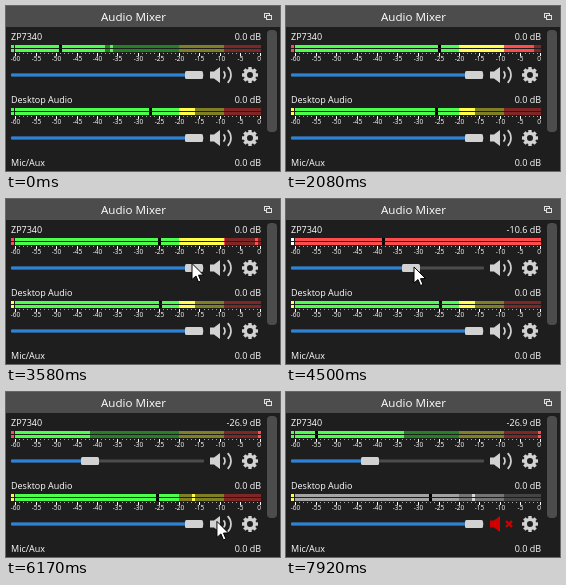
An HTML page with a canvas that plays this animation: 274x165 px, repeating every 8000 ms.

```html
<!DOCTYPE html>
<html lang="en">
<head>
<meta charset="utf-8">
<title>Audio Mixer</title>
<style>
  html, body { margin: 0; width: 100%; height: 100%; overflow: hidden; background: #1f1e1f; }
  canvas { display: block; width: 274px; height: 165px; }
</style>
</head>
<body>
<canvas id="stage"></canvas>
<script>
const W = 274, H = 165, LOOP = 8000, STEP = LOOP / 96;
const canvas = document.getElementById('stage');
const ctx = canvas.getContext('2d');
const ratio = window.devicePixelRatio || 1;
canvas.width = W * ratio;
canvas.height = H * ratio;
ctx.scale(ratio, ratio);

const FONT = '"Open Sans", "Noto Sans", sans-serif';
const ICON = '#d2d2d2', MUTE_RED = '#d00000';
const LEFT = 9, PER_DB = 4.1, DECAY = 23.5;
const LOUD_AT = 1185, CLIP_AT = 3950, CLIP_END = 4800, MUTE_AT = 6400;
const CURSOR = [2050, 7080], DRAG = [4250, 5250];
const KNOB_MAX = 188, GRAB = 3;

const LIVE = {
  back: ['#267f26', '#7f7f26', '#7f2626'],
  front: ['#4cff4c', '#ffff4c', '#ff4c4c']
};
const MUTED = {
  back: ['#5a5a5a', '#757575', '#444444'],
  front: ['#a3a3a3', '#d9d9d9', '#ffffff']
};

// Each phase repeats a peak that then falls; rise is dB per second
const speech = [
  { from: 0, top: -38, rise: 0, period: 527 },
  { from: LOUD_AT, top: -2.5, rise: 0.9, period: 395 },
  { from: CLIP_AT, top: 0.5, rise: 0, period: 1842 },
  { from: 5792, top: -33, rise: 0, period: 527 }
];
const music = [{ from: 0, top: -16.1, rise: 0, period: 250 }];

const voiceMark = [[0, 54], [900, 50], [1650, 153], [3900, 153], [4500, 97], [5300, 8], [7300, 8], [7920, 30]];
const pointer = [
  [2050, 206, 139], [2500, 181, 63], [2750, 181, 63], [4250, 191, 66],
  [4500, 128, 68], [5250, 87, 66], [5550, 87, 66], [6250, 216, 132]
];

const linear = k => k;
const smooth = k => k * k * (3 - 2 * k);
const clamp = (v, a, b) => Math.max(a, Math.min(b, v));
const within = (t, a, b) => t >= a && t < b;
const toX = db => Math.round(LEFT + (db + 60) * PER_DB);
const zone = db => db < -20 ? 0 : db < -9 ? 1 : 2;

function along(keys, t, col, ease) {
  const i = keys.findIndex(k => k[0] > t);
  if (i < 0) return keys[keys.length - 1][col];
  if (i === 0) return keys[0][col];
  const a = keys[i - 1], b = keys[i];
  return a[col] + (b[col] - a[col]) * ease((t - a[0]) / (b[0] - a[0]));
}

function signal(phases, t) {
  const p = phases.filter(ph => ph.from <= t).pop();
  const since = (t - p.from) % p.period;
  const peak = p.top + p.rise * (t - p.from - since) / 1000;
  return { peak, level: clamp(peak - DECAY * since / 1000, -60, 0) };
}

function rect(x, y, w, h, color) {
  ctx.fillStyle = color;
  ctx.fillRect(x, y, w, h);
}

function box(x, y, w, h, r, color) {
  ctx.fillStyle = color;
  ctx.beginPath();
  ctx.roundRect(x, y, w, h, r);
  ctx.fill();
}

function label(text, x, y, size, align = 'left') {
  ctx.font = `${size}px ${FONT}`;
  ctx.textAlign = align;
  ctx.fillStyle = '#fff';
  ctx.fillText(text, x, y);
}

function bar(y, m, pal) {
  const edges = [-60, -20, -9, 0].map(toX);
  const end = m.clip ? edges[3] : toX(m.level);
  for (let i = 0; i < 3; i++) {
    const a = edges[i], b = edges[i + 1];
    rect(a, y, b - a, 3, pal.back[i]);
    if (end > a) rect(a, y, Math.min(b, end) - a, 3, pal.front[m.clip ? 2 : i]);
  }
  rect(toX(m.hold) - 3, y, 3, 3, pal.front[m.clip ? 2 : zone(m.hold)]);
  if (m.mark > LEFT + 2) rect(Math.round(m.mark) - 1, y, 3, 3, '#000');
  rect(5, y, 3, 3, m.input);
}

function meter(y, m, pal) {
  bar(y, m, pal);
  bar(y + 4, m, pal);
  for (let db = -60; db <= 0; db++) {
    const x = Math.min(254, toX(db));
    const major = db % 5 === 0;
    rect(x, y + 8, 1, major ? 3 : 1, major ? '#fff' : '#aaa');
    if (major) label(db, db ? x + 0.5 : 253, y + 16, 6.5, 'center');
  }
}

function slider(y, knob) {
  box(5, y - 1.5, 193, 3, 1, '#4c4c4c');
  box(5, y - 1.5, knob - 5, 3, 1, '#2a82da');
  box(knob - 9, y - 4, 18, 8, 1.5, ICON);
}

function speaker(y, muted) {
  ctx.fillStyle = ctx.strokeStyle = muted ? MUTE_RED : ICON;
  ctx.beginPath();
  [[204, -3.5], [208, -3.5], [214, -8], [214, 8], [208, 3.5], [204, 3.5]]
    .forEach(([x, dy]) => ctx.lineTo(x, y + dy));
  ctx.fill();
  ctx.beginPath();
  if (muted) {
    ctx.lineWidth = 2.2;
    ctx.moveTo(220, y - 3); ctx.lineTo(226, y + 3);
    ctx.moveTo(226, y - 3); ctx.lineTo(220, y + 3);
  } else {
    ctx.lineWidth = 1.7;
    for (const r of [5, 11]) {
      ctx.moveTo(214 + r * Math.cos(0.8), y - r * Math.sin(0.8));
      ctx.arc(214, y, r, -0.8, 0.8);
    }
  }
  ctx.stroke();
}

function gear(x, y) {
  ctx.save();
  ctx.translate(x, y);
  ctx.strokeStyle = ICON;
  ctx.lineWidth = 3.2;
  ctx.beginPath();
  ctx.arc(0, 0, 4.6, 0, Math.PI * 2);
  ctx.stroke();
  for (let i = 0; i < 8; i++) {
    rect(-1.7, -8, 3.4, 3, ICON);
    ctx.rotate(Math.PI / 4);
  }
  ctx.restore();
}

function heading(y, name, volume) {
  label(name, 5, y + 34, 9);
  label(`${volume} dB`, 255, y + 34, 9, 'right');
}

function channel(y, name, volume, knob, m, muted) {
  heading(y, name, volume);
  meter(y + 39, m, muted ? MUTED : LIVE);
  slider(y + 69, knob);
  speaker(y + 69, muted);
  gear(244, y + 69);
}

function arrow(x, y) {
  ctx.beginPath();
  [[0, 0], [0, 16], [4, 12.5], [6.5, 18.5], [9, 17.5], [6.5, 11.7], [11.5, 11.5]]
    .forEach(([dx, dy]) => ctx.lineTo(x + dx, y + dy));
  ctx.closePath();
  ctx.fillStyle = '#fff';
  ctx.fill();
  ctx.strokeStyle = '#000';
  ctx.lineWidth = 1;
  ctx.stroke();
}

function panel() {
  rect(0, 0, W, H, '#1f1e1f');
  rect(0, 0, W, 21, '#4c4c4c');
  label('Audio Mixer', 127.5, 15, 11.6, 'center');
  ctx.strokeStyle = '#e0e0e0';
  ctx.lineWidth = 1;
  ctx.strokeRect(258.5, 7.5, 5, 4);
  rect(260, 9, 6, 5, '#4c4c4c');
  ctx.strokeRect(260.5, 9.5, 5, 4);
  box(261, 24, 10, 102, 4, '#4c4c4c');
}

function inputColor(t) {
  const [green, , red] = LIVE.front;
  if (within(t, CLIP_AT, DRAG[1])) return '#fff';
  return within(t, LOUD_AT, CLIP_AT) || within(t, 5700, 7600) ? red : green;
}

function voice(t) {
  const { peak, level } = signal(speech, t);
  return {
    level,
    hold: t < LOUD_AT ? -36 : t < CLIP_AT ? peak : 0,
    mark: along(voiceMark, t, 1, linear),
    clip: within(t, CLIP_AT, CLIP_END),
    input: inputColor(t)
  };
}

function desktop(t) {
  const { peak, level } = signal(music, t);
  const turn = t / LOOP * Math.PI * 2;
  return {
    level,
    hold: peak,
    mark: 150 - 3 * Math.cos(turn) - 3 * Math.cos(3 * turn),
    clip: false,
    input: LIVE.front[t < LOUD_AT ? 0 : 1]
  };
}

function draw(t) {
  panel();
  const knob = along(pointer, clamp(t, ...DRAG), 1, smooth) - GRAB;
  const cut = KNOB_MAX - knob;
  const volume = cut ? (-0.02934 * cut - 0.002205 * cut * cut).toFixed(1) : '0.0';

  channel(0, 'ZP7340', volume, knob, voice(t), false);
  channel(63, 'Desktop Audio', '0.0', KNOB_MAX, desktop(t), t >= MUTE_AT);
  heading(126, 'Mic/Aux', '0.0');

  if (within(t, ...CURSOR)) arrow(along(pointer, t, 1, smooth), along(pointer, t, 2, smooth));
}

const start = performance.now();
function tick() {
  const t = (performance.now() - start) % LOOP;
  draw(Math.floor(t / STEP + 0.01) * STEP);
  requestAnimationFrame(tick);
}
tick();
</script>
</body>
</html>
```
